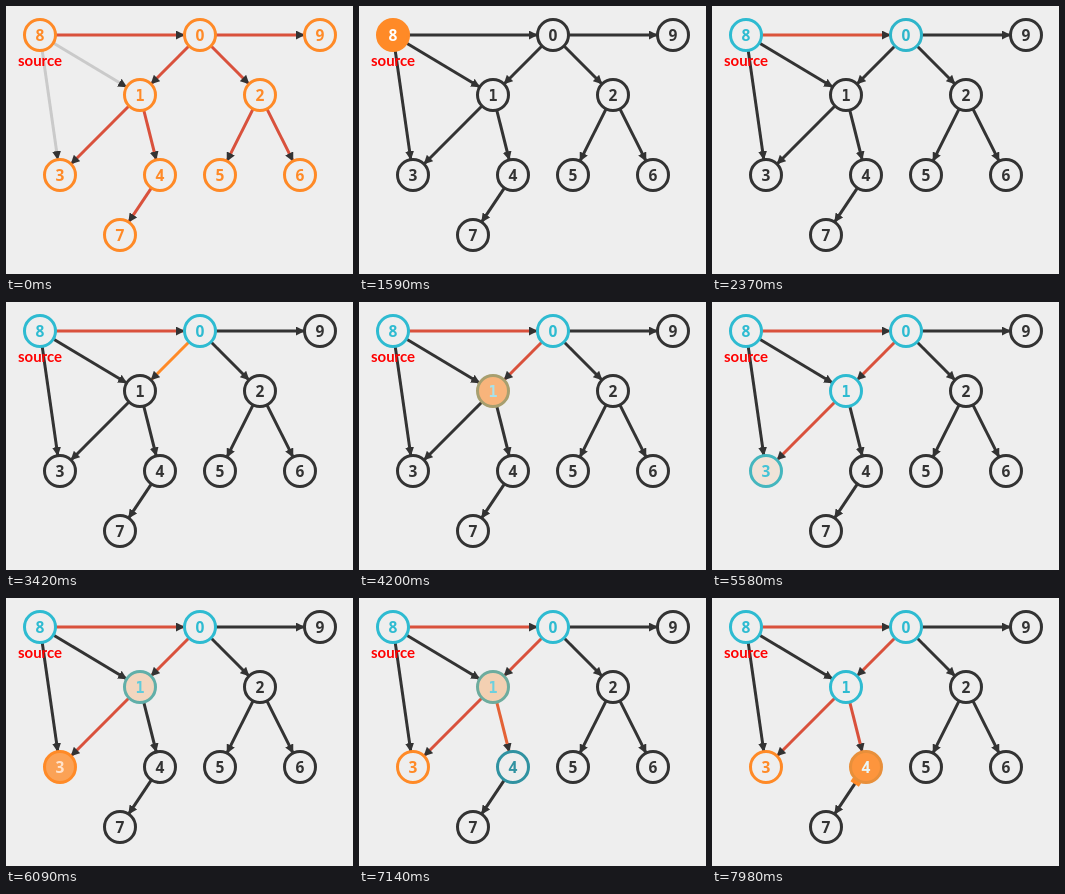
Animation of 347x268 px, one loop 8000 ms. Source, as an HTML page:

```html
<!DOCTYPE html>
<html lang="en">
<head>
<meta charset="utf-8">
<title>Depth-first search</title>
<style>
  html, body { margin: 0; width: 100%; height: 100%; overflow: hidden; background: #eee; }
  svg { display: block; }
  text { font: bold 15.5px "Open Sans", sans-serif; text-anchor: middle; }
  .one { font: bold 15px "DejaVu Sans Mono", monospace; }
  .label { font: bold 15px Lato, sans-serif; fill: #f00; }
</style>
</head>
<body>
<svg id="stage" width="347" height="268" viewBox="0 0 347 268">
  <defs>
    <marker id="arrow" viewBox="0 -5 10 10" refX="9" markerWidth="3" markerHeight="3" orient="auto">
      <path d="M0,-5L10,0L0,5" fill="#333"/>
    </marker>
  </defs>
</svg>
<script>
const LOOP = 8000, RESET = 1080, FADE = 400, REACH = 16;

const DARK = [51, 51, 51], PAPER = [238, 238, 238], WHITE = [255, 255, 255];
const ORANGE = [255, 138, 39], RED = [217, 81, 60], CYAN = [46, 187, 209], GRAY = [202, 202, 202];

// Node looks: ring, fill, digit
const LOOK = {
  idle: [DARK, PAPER, DARK],
  seen: [CYAN, PAPER, CYAN],
  hot: [ORANGE, ORANGE, WHITE],
  done: [ORANGE, PAPER, ORANGE]
};

const PLACES = [
  [194, 29], [134, 89], [254, 89], [54, 169], [154, 169],
  [214, 169], [294, 169], [114, 229], [34, 29], [314, 29]
];
const LINKS = ['8-1', '8-3', '8-0', '0-9', '0-1', '0-2', '1-3', '1-4', '2-5', '2-6', '4-7'];
const SKIPPED = ['8-1', '8-3'];

const STEPS = [
  { at: 1565, nodes: { 8: 'seen' }, grow: '8-0' },
  { at: 2060, nodes: { 0: 'seen' }, take: '8-0' },
  { at: 2540, nodes: { 0: 'hot' } },
  { at: 3005, nodes: { 0: 'seen' }, grow: '0-1' },
  { at: 3520, nodes: { 1: 'seen' }, take: '0-1' },
  { at: 3990, nodes: { 1: 'hot' } },
  { at: 4470, nodes: { 1: 'seen' }, grow: '1-3' },
  { at: 4965, nodes: { 3: 'seen' }, take: '1-3' },
  { at: 5460, nodes: { 3: 'hot' } },
  { at: 5935, nodes: { 3: 'done', 1: 'hot' } },
  { at: 6395, nodes: {}, grow: '1-4' },
  { at: 6910, nodes: { 1: 'seen', 4: 'seen' }, take: '1-4' },
  { at: 7390, nodes: { 4: 'hot' } },
  { at: 7860, nodes: { 4: 'seen' }, grow: '4-7' }
];

const stage = document.getElementById('stage');

function add(tag, attrs) {
  const el = document.createElementNS('http://www.w3.org/2000/svg', tag);
  for (const key in attrs) el.setAttribute(key, attrs[key]);
  return stage.appendChild(el);
}

const ease = u => u < 0.5 ? 4 * u ** 3 : 1 - 4 * (1 - u) ** 3;
const mix = (a, b, p) => a.map((v, i) => v + (b[i] - v) * p);
const css = c => `rgb(${c.map(Math.round)})`;

const edges = LINKS.map(id => {
  const [a, b] = id.split('-').map(n => PLACES[n]);
  const dx = b[0] - a[0], dy = b[1] - a[1], k = REACH / Math.hypot(dx, dy);
  const from = [a[0] + dx * k, a[1] + dy * k];
  const to = [b[0] - dx * k, b[1] - dy * k];
  const path = `M${from}L${to}`;
  return {
    id, from, to,
    line: add('path', { d: path, 'stroke-width': 3, 'marker-end': 'url(#arrow)' }),
    flow: add('path', { stroke: css(ORANGE), 'stroke-width': 10 })
  };
});

const nodes = PLACES.map(([x, y], n) => {
  const disc = add('circle', { cx: x, cy: y, r: 15.5, 'stroke-width': 3 });
  const digit = add('text', { x, y: y + 5.5 });
  digit.textContent = n;
  if (n === 1) digit.setAttribute('class', 'one');
  return { disc, digit };
});

add('text', { x: 34, y: 60, class: 'label' }).textContent = 'source';

function nodeLook(n, t) {
  if (t < RESET) return LOOK.done;
  let look = n === 8 ? LOOK.hot : LOOK.idle;
  for (const { at, nodes } of STEPS) {
    if (t < at) break;
    if (!nodes[n]) continue;
    const p = ease(Math.min(1, (t - at) / FADE));
    look = look.map((c, i) => mix(c, LOOK[nodes[n]][i], p));
  }
  return look;
}

function edgeLook(id, t) {
  if (t < RESET) {
    return { color: SKIPPED.includes(id) ? GRAY : RED, flow: 0 };
  }
  let color = DARK, flow = 0;
  for (const { at, grow, take } of STEPS) {
    if (t < at) break;
    const u = Math.min(1, (t - at) / FADE);
    if (grow === id) {
      if (u < 1) flow = ease(u);
      else color = ORANGE;
    }
    if (take === id) color = mix(ORANGE, RED, ease(u));
  }
  return { color, flow };
}

function draw(t) {
  nodes.forEach(({ disc, digit }, n) => {
    const [ring, fill, ink] = nodeLook(n, t).map(css);
    disc.setAttribute('stroke', ring);
    disc.setAttribute('fill', fill);
    digit.setAttribute('fill', ink);
  });
  for (const e of edges) {
    const { color, flow } = edgeLook(e.id, t);
    e.line.setAttribute('stroke', css(color));
    e.flow.setAttribute('d', flow ? `M${e.from}L${mix(e.from, e.to, flow)}` : '');
  }
}

const start = performance.now();
function tick() {
  draw((performance.now() - start) % LOOP);
  requestAnimationFrame(tick);
}
tick();
</script>
</body>
</html>
```
